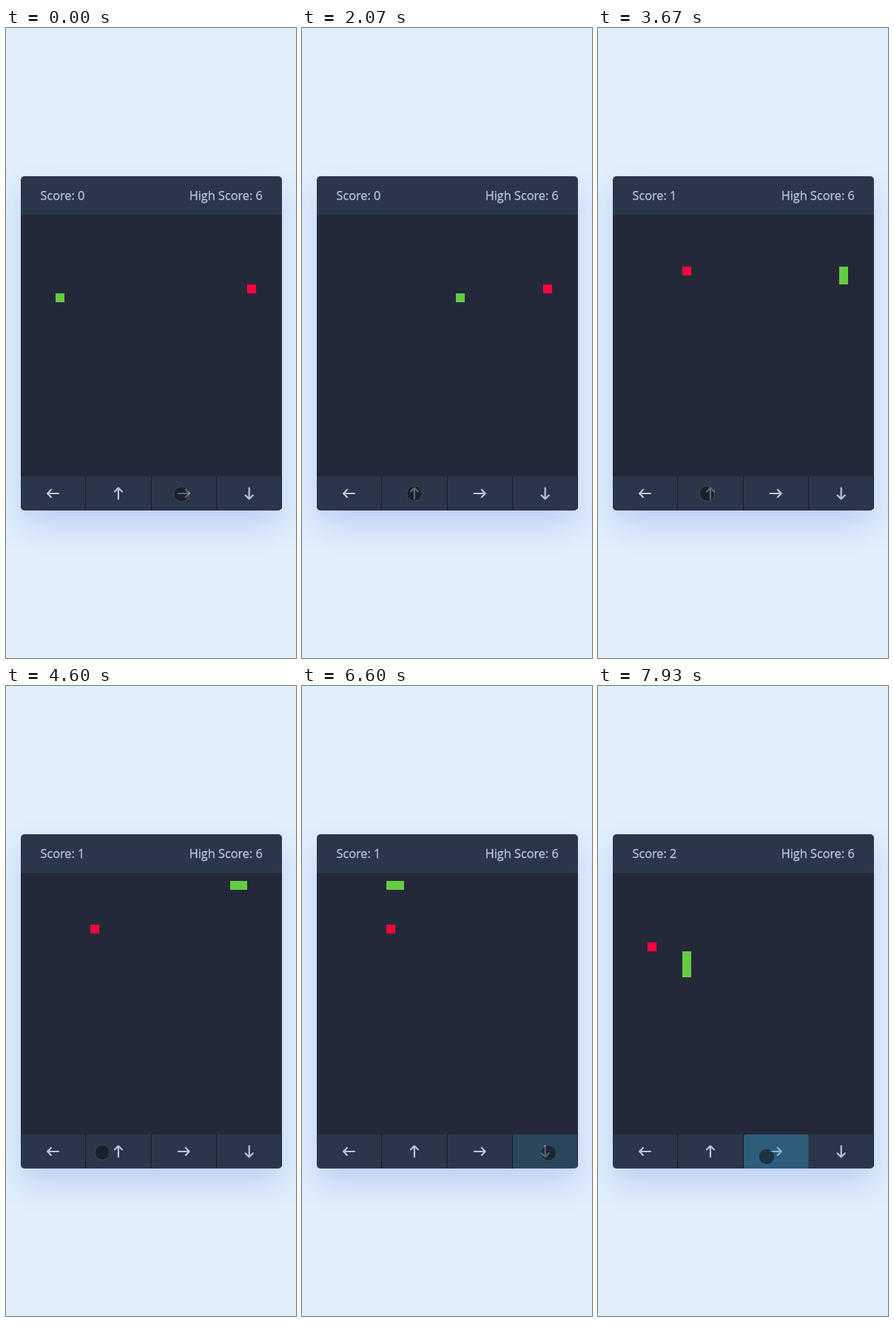
Animation of 392 by 850 pixels, one loop 8000 ms. Source, as an HTML page:

```html
<!DOCTYPE html>
<html lang="en">
<head>
<meta charset="utf-8">
<title>Snake</title>
<style>
  html, body { margin: 0; width: 100%; height: 100%; overflow: hidden; background: #e1effb; }
  .card {
    position: absolute; left: 20px; top: 200px; width: 353px; height: 451px;
    border-radius: 5px; background: #2b364a; box-shadow: 0 20px 40px rgba(52, 87, 220, .2);
  }
  svg { position: absolute; left: 0; top: 0; }
  text {
    font: 500 16.3px "Open Sans", sans-serif;
    fill: #b8c6dc; stroke: #b8c6dc; stroke-width: .3px;
  }
  .arrow { fill: none; stroke: #b8c6dc; stroke-width: 2.2; stroke-linecap: round; stroke-linejoin: round; }
</style>
</head>
<body>
<div class="card"></div>
<svg width="392" height="850" viewBox="0 0 392 850">
  <defs><path id="arrow" class="arrow" d="M7.5 0H-7.5M-2.5 -5L-7.5 0L-2.5 5"/></defs>
  <text id="score" x="46.5" y="232"></text>
  <text x="346.8" y="232" text-anchor="end">High Score: 6</text>
  <rect x="20" y="252" width="353" height="353" fill="#24293a"/>
  <path d="M107.5 605v46M196.5 605v46M284.5 605v46M372.5 605v43" stroke="#171b26"/>
  <g id="arrows"></g>
  <rect id="tap" y="605" width="88" height="46" rx="3" fill="rgb(51,153,193)"/>
  <rect id="food" width="12" height="12" fill="#ff003f"/>
  <g id="snake" fill="#64cb43"></g>
  <circle id="cursor" r="10.2" fill="rgba(10,10,12,.5)" stroke="rgb(110,110,110)"/>
</svg>
<script>
const LOOP = 8000, START = 505, TICK = 126, CELL = 11.773, BUTTON = 88.4;
const buttons = ["left", "up", "right", "down"];
const step = { left: [-1, 0], up: [0, -1], right: [1, 0], down: [0, 1] };
const foods = [[26, 8], [8, 6], [4, 8]];

// Each turn is tapped just after a tick; the cursor glides to (x, y) beforehand.
const turns = [
  { tick: 0, dir: "right", glide: 0, duration: 400, x: 243, y: 629 },
  { tick: 22, dir: "up", glide: 1050, duration: 550, x: 152, y: 628 },
  { tick: 30, dir: "left", glide: 3655, duration: 600, x: 66, y: 629 },
  { tick: 48, dir: "down", glide: 4417, duration: 1433, x: 333, y: 630 },
  { tick: 58, dir: "right", glide: 7400, duration: 380, x: 228, y: 635 }
];

const byId = id => document.getElementById(id);
const clamp = v => Math.max(0, Math.min(1, v));
const setAttrs = (el, attrs) => { for (const k in attrs) el.setAttribute(k, attrs[k]); };

function addTo(parent, tag, attrs) {
  const el = document.createElementNS("http://www.w3.org/2000/svg", tag);
  setAttrs(el, attrs);
  return byId(parent).appendChild(el);
}

function play(ticks) {
  let body = [[4, 9]], score = 0;
  for (let n = 0; n < ticks; n++) {
    const [x, y] = body[0];
    const [dx, dy] = step[turns.findLast(turn => turn.tick <= n).dir];
    if (String(body[0]) === String(foods[score])) score++;
    body = [[x + dx, y + dy], ...body].slice(0, score + 1);
  }
  return { body, score };
}

function placeCell(el, [col, row]) {
  setAttrs(el, { x: Math.round(20.05 + col * CELL), y: Math.round(251.7 + row * CELL) });
}

function cursorAt(t) {
  let x = 237, y = 629;
  for (const move of turns) {
    const ease = 1 - (1 - clamp((t - move.glide) / move.duration)) ** 2;
    x += (move.x - x) * ease;
    y += (move.y - y) * ease;
  }
  return { cx: x, cy: y };
}

function render(t) {
  const { body, score } = play(Math.floor((t - START) / TICK));
  byId("score").textContent = "Score: " + score;
  placeCell(byId("food"), foods[score]);
  segments.forEach((el, i) => placeCell(el, body[i] || body[0]));

  const tapAge = turn => t - START - turn.tick * TICK - 25;
  const turn = turns.findLast(turn => tapAge(turn) >= 0) || turns[0];
  const age = tapAge(turn);
  const glow = clamp(Math.min(age / 60, (220 - age) / 80));
  setAttrs(byId("tap"), {
    x: Math.round(20 + buttons.indexOf(turn.dir) * BUTTON),
    opacity: 0.4 * glow
  });
  setAttrs(byId("cursor"), { ...cursorAt(t), "stroke-opacity": 0.45 * (1 - glow) });
}

function frame() {
  render(performance.now() % LOOP);
  requestAnimationFrame(frame);
}

buttons.forEach((dir, i) => addTo("arrows", "use", {
  href: "#arrow", transform: `translate(${63.5 + i * BUTTON} 628) rotate(${i * 90})`
}));
byId("arrows").lastChild.setAttribute("transform", `translate(${63.5 + 3 * BUTTON} 628) rotate(-90)`);
const segments = foods.map(() => addTo("snake", "rect", { width: 12, height: 12 }));
frame();
</script>
</body>
</html>
```
